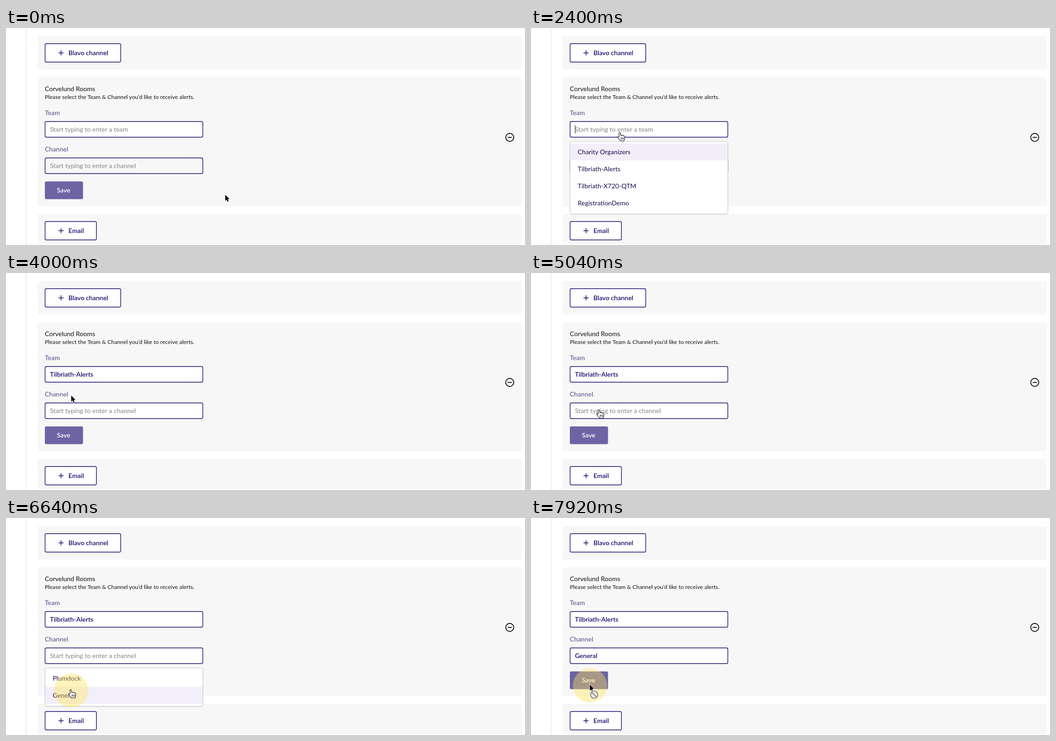
An HTML page that plays this animation: 1122x471 px, repeating every 8 s.

```html
<!DOCTYPE html>
<html lang="en">
<head>
<meta charset="utf-8">
<title>Alert channel form</title>
<style>
  html, body { margin: 0; width: 100%; height: 100%; overflow: hidden; background: #fff; }
  svg { display: block; width: 1122px; height: 471px; font: 14px Lato, "Open Sans", sans-serif; }
  text { fill: #1c0b50; white-space: pre; }
  .card { fill: #f7f7f7; }
  .box { fill: #fff; stroke: #1e0a6e; stroke-width: 1.4; }
  .plus { stroke: #1e0a6e; stroke-width: 1.5; }
  .bold { font-weight: 600; fill: #1e0a6e; }
  .label { fill: #574a86; }
  .hint { fill: #858585; }
  .dark { fill: #111; }
  .menu { fill: #fff; stroke: #c9c8ce; filter: drop-shadow(0 1px 1px rgba(0,0,0,.1)); }
  .hover { fill: #f2effa; }
  .caret { stroke: #222; stroke-width: 1; }
  .icon { fill: none; stroke: #111; stroke-width: 1.9; }
</style>
</head>
<body>
<svg id="stage" viewBox="0 0 1122 471"></svg>
<script>
const LOOP = 8000, STEP = 80;
const TEAMS = ['Charity Organizers', 'Tilbriath-Alerts', 'Tilbriath-X720-QTM', 'RegistrationDemo'];
const CHANNELS = ['Plumdock', 'General'];

const rect = (cls, x, y, w, h, r = 0, extra = '') =>
  `<rect class="${cls}" x="${x}" y="${y}" width="${w}" height="${h}" rx="${r}" ${extra}/>`;
const text = (cls, x, y, str, extra = '') =>
  `<text class="${cls}" x="${x}" y="${y}" ${extra}>${str}</text>`;

const addButton = (y, w, label) =>
  rect('box', 84.5, y, w, 40, 3) +
  `<path class="plus" d="M113.5 ${y + 20}h11m-5.5-5.5v11"/>` +
  text('bold', 135, y + 25, label);

const field = (id, y, label, hint) =>
  text('label', 84, y - 14, label) +
  rect('box', 84.5, y, 341, 34, 3, `id="${id}Box"`) +
  text('hint', 95, y + 21.5, hint, `id="${id}Text"`) +
  `<path class="caret" id="${id}Caret" d="M95.5 ${y + 8}v18"/>`;

const menu = (id, y, items) =>
  `<g id="${id}Menu">` +
  rect('menu', 84.5, y, 341, items.length * 37 + 9, 3) +
  rect('hover', 85, y + 4, 340, 37, 0, `id="${id}Row"`) +
  items.map((s, i) => text('', 101, y + 27.5 + i * 37, s)).join('') + '</g>';

const arrowPath = 'M0 0V13.2L3 10.4L5 15.2L7.2 14.3L5.2 9.6H9.4Z';
const handPath = 'M-1.2 8.5L-2 2C-2.2-.6 .8-.8 1.2 1.6L1.9 6.2C2.6 5 4.6 5 5 6.6C6 5.6 7.6 6 7.9 7.4' +
  'C9.2 6.6 10.5 7.4 10.5 9V13C10.5 15 9.2 15.6 9 18H1C.6 16-2.8 13-4.6 10.6C-5.6 9-3.6 7.6-2.4 9Z';

const stage = document.getElementById('stage');
stage.innerHTML =
  '<path d="M43.5 0V471" stroke="#e1e1e4"/>' +
  rect('card', 68, 18, 1047, 72, 4) + addButton(34, 163.5, 'Blavo channel') +
  rect('card', 68, 107, 1047, 280, 4) +
  text('dark', 84, 137, 'Corvelund Rooms') +
  text('dark', 84, 154, 'Please select the Team &amp; Channel you’d like to receive alerts.', 'font-size="12.2"') +
  field('team', 203, 'Team', 'Start typing to enter a team') +
  field('chan', 282, 'Channel', 'Start typing to enter a channel') +
  rect('', 84, 333, 82.5, 38.5, 3, 'id="save"') +
  text('', 110, 357, 'Save', 'style="fill:#fff;font-weight:600"') +
  '<g class="icon"><circle cx="1089" cy="237.5" r="8.7"/><path d="M1084.5 237.5h9"/></g>' +
  rect('card', 68, 404, 1047, 65, 4) + addButton(420, 111, 'Email') +
  menu('team', 246.5, TEAMS) + menu('chan', 325.5, CHANNELS) +
  `<g id="pointer">
    <circle id="press" cx=".5" cy="2" r="37" fill="rgba(255,228,85,.4)"/>
    <path id="arrow" d="${arrowPath}" stroke="#fff" stroke-width="1.6" paint-order="stroke"/>
    <g id="hand" stroke="#111" stroke-width="1.1" stroke-linejoin="round">
      <path d="${handPath}" fill="#fff"/><path d="M2.6 10.5v4.5m2.6-4.5v4.5m2.6-4.5v4.5"/>
    </g>
    <g id="blocked" fill="none">
      <circle cx="9.5" cy="22" r="8" stroke="#fff" stroke-width="4"/>
      <g stroke="#8d8d8d" stroke-width="2.2"><circle cx="9.5" cy="22" r="8" fill="#e9e6dc"/><path d="M4 16.5l11 11"/></g>
    </g>
  </g>`;

const el = {};
stage.querySelectorAll('[id]').forEach(n => el[n.id] = n);

const ease = {
  both: p => p * p * (3 - 2 * p),
  in: p => p * p,
  out: p => p * (2 - p),
};

// time, x, y, easing towards this point
const path = [
  [0, 474, 362], [80, 474, 362], [160, 473.4, 362], [760, 473.4, 362], [1600, 192, 227],
  [2400, 192, 227], [3040, 152, 290], [3520, 146, 306], [3680, 146, 306],
  [4000, 141, 266, 'in'], [4480, 135, 224, 'out'], [4640, 135, 224], [5040, 147, 297],
  [5440, 147, 297], [5760, 146.5, 337.5, 'in'], [5920, 143, 370, 'out'], [6160, 141, 371],
  [6800, 140, 373], [6960, 137, 376.5], [7120, 137, 376.5], [7440, 127, 361.5], [LOOP, 127, 361.5],
];

function pointerAt(t) {
  const i = path.findIndex(k => k[0] > t);
  const [t0, x0, y0] = path[i - 1], [t1, x1, y1, mode = 'both'] = path[i];
  const p = ease[mode]((t - t0) / (t1 - t0));
  return [x0 + (x1 - x0) * p, y0 + (y1 - y0) * p];
}

const within = (t, ...spans) => spans.some(([a, b]) => t >= a && t < b);
const show = (node, on) => node.style.display = on ? '' : 'none';

function setValue(id, value, hint) {
  el[id + 'Text'].textContent = value || hint;
  el[id + 'Text'].setAttribute('class', value ? 'bold' : 'hint');
}

function setMenu(id, open, top, count, y) {
  show(el[id + 'Menu'], open);
  const row = Math.max(0, Math.min(count - 1, Math.floor((y - top) / 37)));
  el[id + 'Row'].setAttribute('y', top + row * 37);
}

function render(t) {
  const [x, y] = pointerAt(t);
  const teamSet = t >= 3760, chanSet = t >= 6800, saved = t >= 7920;
  const teamOpen = within(t, [2320, 3760]), chanOpen = within(t, [5360, 6800]);
  const ready = chanSet && !saved;

  setValue('team', teamSet && TEAMS[1], 'Start typing to enter a team');
  setValue('chan', chanSet && CHANNELS[1], 'Start typing to enter a channel');
  el.chanBox.style.fill = teamSet ? '#fff' : '#f7f7f7';
  el.save.style.fill = ready ? '#1e0a6e' : '#6e64a4';
  setMenu('team', teamOpen, 250.5, TEAMS.length, y);
  setMenu('chan', chanOpen, 329.5, CHANNELS.length, y);
  show(el.teamCaret, within(t, [2320, 2640], [3120, 3600]));
  show(el.chanCaret, within(t, [5360, 5680], [6080, 6560]));

  const over = (top, bottom, right = 426) => x > 84 && x < right && y > top && y < bottom;
  const hand = over(203, 238) || (teamSet && over(282, 316)) || (teamOpen && over(246, 404)) ||
    (chanOpen && over(325, 409)) || (ready && over(333, 372, 167));
  show(el.hand, hand);
  show(el.arrow, !hand);
  show(el.blocked, saved);
  show(el.press, within(t, [2240, 2400], [3680, 3840], [5280, 5440], [6480, 7040], [7840, LOOP]));
  el.pointer.setAttribute('transform', `translate(${x} ${y})`);
}

const start = performance.now();
function tick() {
  const t = (performance.now() - start) % LOOP;
  render(Math.floor(t / STEP) * STEP);
  requestAnimationFrame(tick);
}
tick();
</script>
</body>
</html>
```
